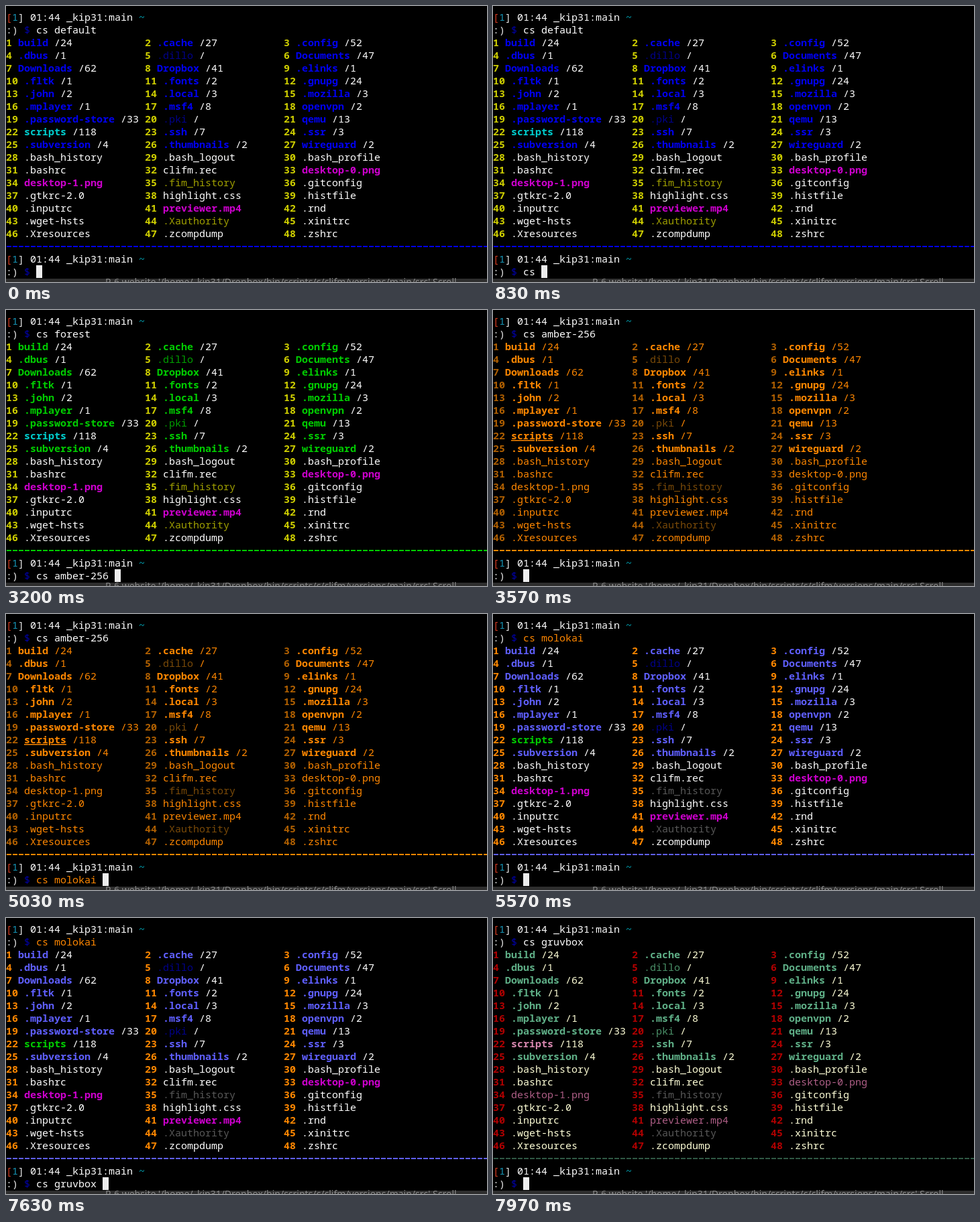
Animation, 717 px wide and 412 px high, one loop 8000 ms. Source, as an HTML page:

```html
<!DOCTYPE html>
<html lang="en">
<head>
<meta charset="utf-8">
<title>Terminal color schemes</title>
<style>
  html, body { margin: 0; width: 100%; height: 100%; overflow: hidden; background: #000; }
  svg { display: block; width: 717px; height: 412px; }
  text { font: 15px "Noto Sans Mono", "DejaVu Sans Mono", monospace; white-space: pre; }
  .bold { font-weight: 700; }
  .under { text-decoration: underline; }
  .behind { font: 14px "Noto Sans", sans-serif; }
</style>
</head>
<body>
<svg id="stage" viewBox="0 0 717 412" xmlns="http://www.w3.org/2000/svg">
  <rect width="717" height="412"/>
  <rect y="407" width="717" height="5" fill="#2e2e2e"/>
  <text class="behind" x="148" y="417" fill="#8a8a8a">P-6 website '/home/_kip31/Dropbox/bin/scripts/c/clifm/versions/main/src' Scroll</text>
  <rect width="717" height="406"/>
  <g id="screen"></g>
  <g id="input"></g>
</svg>
<script>
const CELL = 9, LINE = 19, LOOP = 8000, COLUMN = 23;
const screenGroup = document.getElementById('screen');
const inputGroup = document.getElementById('input');

const entries = `build/24 .cache/27 .config/52 .dbus/1 .dillo/ Documents/47
Downloads/62 Dropbox/41 .elinks/1 .fltk/1 .fonts/2 .gnupg/24 .john/2 .local/3 .mozilla/3
.mplayer/1 .msf4/8 openvpn/2 .password-store/33 .pki/ qemu/13 scripts/118 .ssh/7 .ssr/3
.subversion/4 .thumbnails/2 wireguard/2 .bash_history .bash_logout .bash_profile
.bashrc clifm.rec desktop-0.png desktop-1.png .fim_history .gitconfig
.gtkrc-2.0 highlight.css .histfile .inputrc previewer.mp4 .rnd
.wget-hsts .Xauthority .xinitrc .Xresources .zcompdump .zshrc`.split(/\s+/);

// Each style is a color, optionally followed by class names.
const base = {
  index: '#cdcd00 bold', dir: '#0000ee bold', empty: '#00008b', link: '#00cdcd bold',
  file: '#ffffff', media: '#cd00cd bold', locked: '#a0a000', typed: '#ffffff'
};
const themes = {
  default: base,
  forest: { ...base, dir: '#00cd00 bold', empty: '#00a000' },
  'amber-256': {
    index: '#af5f00 bold', dir: '#ff8700 bold', empty: '#7a4a08', link: '#ff8700 bold under',
    file: '#ff8700', media: '#ff8700', locked: '#7a4a08', typed: '#ff8700'
  },
  molokai: { ...base, index: '#ff8700 bold', dir: '#5f5fff bold', link: '#00cd00 bold', locked: '#585858' },
  gruvbox: {
    ...base, index: '#af0000 bold', dir: '#5faf87 bold', empty: '#4a9068', link: '#d787af bold',
    file: '#ffffd7', media: '#af5f87', locked: '#585858'
  }
};

// When each scheme takes effect, and the color its command was typed in.
const runs = [
  [0, 'default', '#ffffff'], [1630, 'forest', '#ffffff'], [3570, 'amber-256', '#ffffff'],
  [5570, 'molokai', '#ff8700'], [7970, 'gruvbox', '#ffffff']
];

const keys = [
  [0, ''], [630, 'c'], [730, 'cs'], [830, 'cs '], [1400, 'cs f'], [1430, 'cs forest '],
  [1630, ''], [2130, 'c'], [2200, 'cs'], [2370, 'cs '], [2670, 'cs a'], [2770, 'cs am'],
  [3070, 'cs amb'], [3200, 'cs amber-256 '],
  [3570, ''], [4030, 'c'], [4100, 'cs'], [4270, 'cs '], [4400, 'cs m'], [4630, 'cs mo'],
  [4730, 'cs mol'], [4930, 'cs molo'], [5030, 'cs molokai '],
  [5570, ''], [6070, 'c'], [6130, 'cs'], [6800, 'cs gu'], [7130, 'cs g'], [7370, 'cs gr'],
  [7530, 'cs gru'], [7630, 'cs gruvbox '], [7970, '']
];

const latest = (steps, time) => steps.findLast(step => step[0] <= time);

function put(col, row, string, style) {
  const [color, ...classes] = style.split(' ');
  return `<text x="${col * CELL}" y="${22 + row * LINE}" fill="${color}" class="${classes.join(' ')}">${string}</text>`;
}

function prompt(row) {
  return put(0, row, '[', '#d03a20') + put(1, row, '1', '#1797b8') + put(2, row, ']', '#e5e5e5')
    + put(4, row, '01:44 _kip31:main', '#ffffff') + put(22, row, '~', '#00a5b5')
    + put(0, row + 1, ':)', '#e5e5e5') + put(3, row + 1, '$', '#0000a8');
}

function kindOf(entry) {
  if (entry.startsWith('scripts')) return 'link';
  if (entry.endsWith('/')) return 'empty';
  if (entry.includes('/')) return 'dir';
  if (/\.(png|mp4)$/.test(entry)) return 'media';
  return /fim_history|Xauthority/.test(entry) ? 'locked' : 'file';
}

function listing(theme) {
  return entries.map((entry, i) => {
    const [name, count] = entry.split('/');
    const number = String(i + 1);
    const row = 2 + Math.floor(i / 3);
    const col = i % 3 * COLUMN;
    const nameCol = col + number.length + 1;
    return put(col, row, number, theme.index)
      + put(nameCol, row, name, theme[kindOf(entry)])
      + (count === undefined ? '' : put(nameCol + name.length + 1, row, '/' + count, theme.file));
  }).join('');
}

function drawScreen([, name, commandColor]) {
  const theme = themes[name];
  const lineColor = theme.dir.split(' ')[0];
  const lineWidth = name === 'gruvbox' ? 1.2 : 1.8;
  screenGroup.innerHTML = prompt(0) + put(5, 1, 'cs ' + name, commandColor) + listing(theme)
    + `<path d="M1 359H717" stroke="${lineColor}" stroke-width="${lineWidth}" stroke-dasharray="7 2"/>`
    + prompt(19);
}

function drawInput(typed, color) {
  inputGroup.innerHTML = put(5, 20, typed, color)
    + `<rect x="${(5 + typed.length) * CELL}" y="387" width="${CELL}" height="${LINE}" fill="#eeeeee"/>`;
}

let shownRun, shownKey;
function render(time) {
  const run = latest(runs, time);
  const key = latest(keys, time);
  if (run !== shownRun) drawScreen(run);
  if (key !== shownKey) drawInput(key[1], themes[run[1]].typed);
  shownRun = run;
  shownKey = key;
}

const start = performance.now();
function tick() {
  render((performance.now() - start) % LOOP);
  requestAnimationFrame(tick);
}
tick();
</script>
</body>
</html>
```
